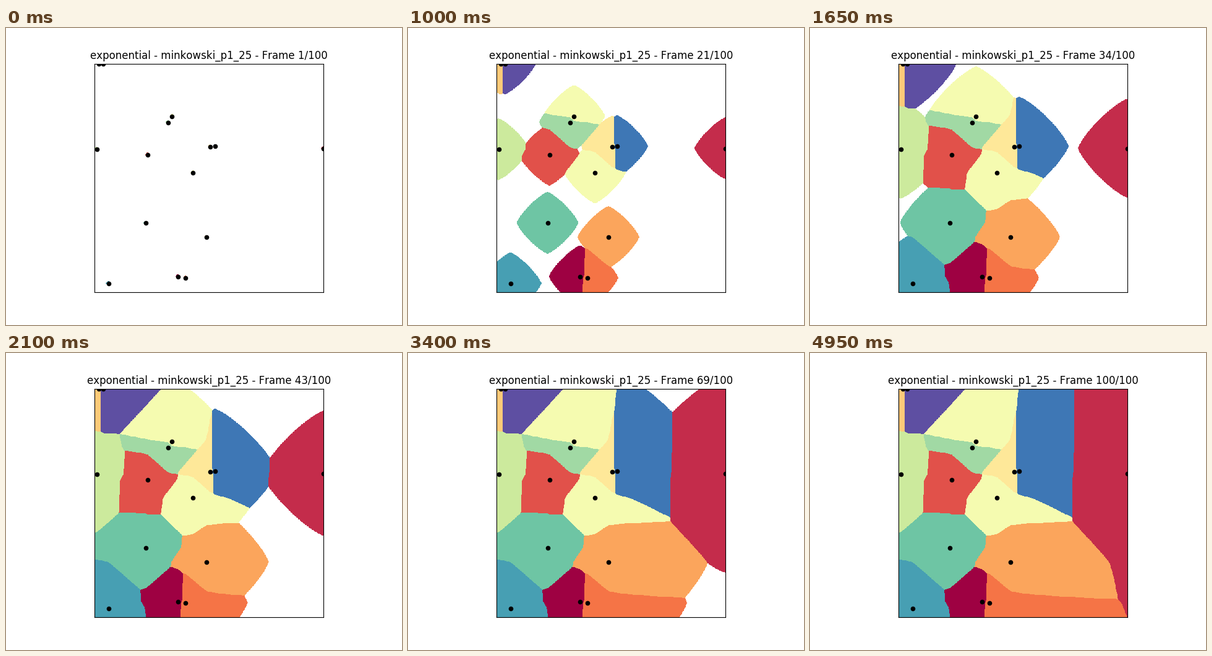
Recreate the animation shown at these times as a matplotlib script. Size 640 px wide and 480 px high, loop 5000 ms.

```python
import numpy as np
import matplotlib.pyplot as plt
from matplotlib.animation import FuncAnimation
from matplotlib.colors import ListedColormap

FRAMES = 100
P = 1.25
CELLS = 500

plt.rcParams["text.kerning_factor"] = 6

# Seed points in thousandths of the unit square, in colour order.
seeds = np.array([
    (364, 69), (1000, 629), (231, 601), (397, 63), (489, 241),
    (18, 1000), (505, 636), (430, 523), (339, 770), (9, 625),
    (321, 743), (223, 303), (61, 39), (527, 638), (38, 1000),
]) / 1000

colors = plt.get_cmap("Spectral")(np.linspace(0, 1, len(seeds)))
colors[7:9] = colors[7:9].mean(axis=0)  # the two pale yellows share a tone
cmap = ListedColormap(colors)
cmap.set_bad("white")

# Minkowski distance of every cell to every seed.
axis = (np.arange(CELLS) + 0.5) / CELLS
gx, gy = np.meshgrid(axis, axis)
dist = np.array([(abs(gx - x) ** P + abs(gy - y) ** P) ** (1 / P)
                 for x, y in seeds])
owner = dist.argmin(axis=0)
nearest = dist.min(axis=0)
radii = np.linspace(0.01, nearest.max(), FRAMES)


def grown(i):
    return np.ma.masked_where(nearest > radii[i], owner)


fig, ax = plt.subplots(figsize=(6.4, 4.8), dpi=100)
image = ax.imshow(grown(0), cmap=cmap, vmin=0, vmax=len(seeds) - 1,
                  extent=(0, 1, 0, 1), origin="lower", interpolation="nearest")
ax.scatter(*seeds.T, c="black", s=20)
ax.set(xlim=(0, 1), ylim=(0, 1), xticks=[], yticks=[])
title = ax.set_title("")


def update(i):
    image.set_data(grown(i))
    title.set_text(f"exponential - minkowski_p1_25 - Frame {i + 1}/{FRAMES}")
    return image, title


anim = FuncAnimation(fig, update, frames=FRAMES, interval=50,
                     repeat=True, repeat_delay=0)
plt.show()
```
